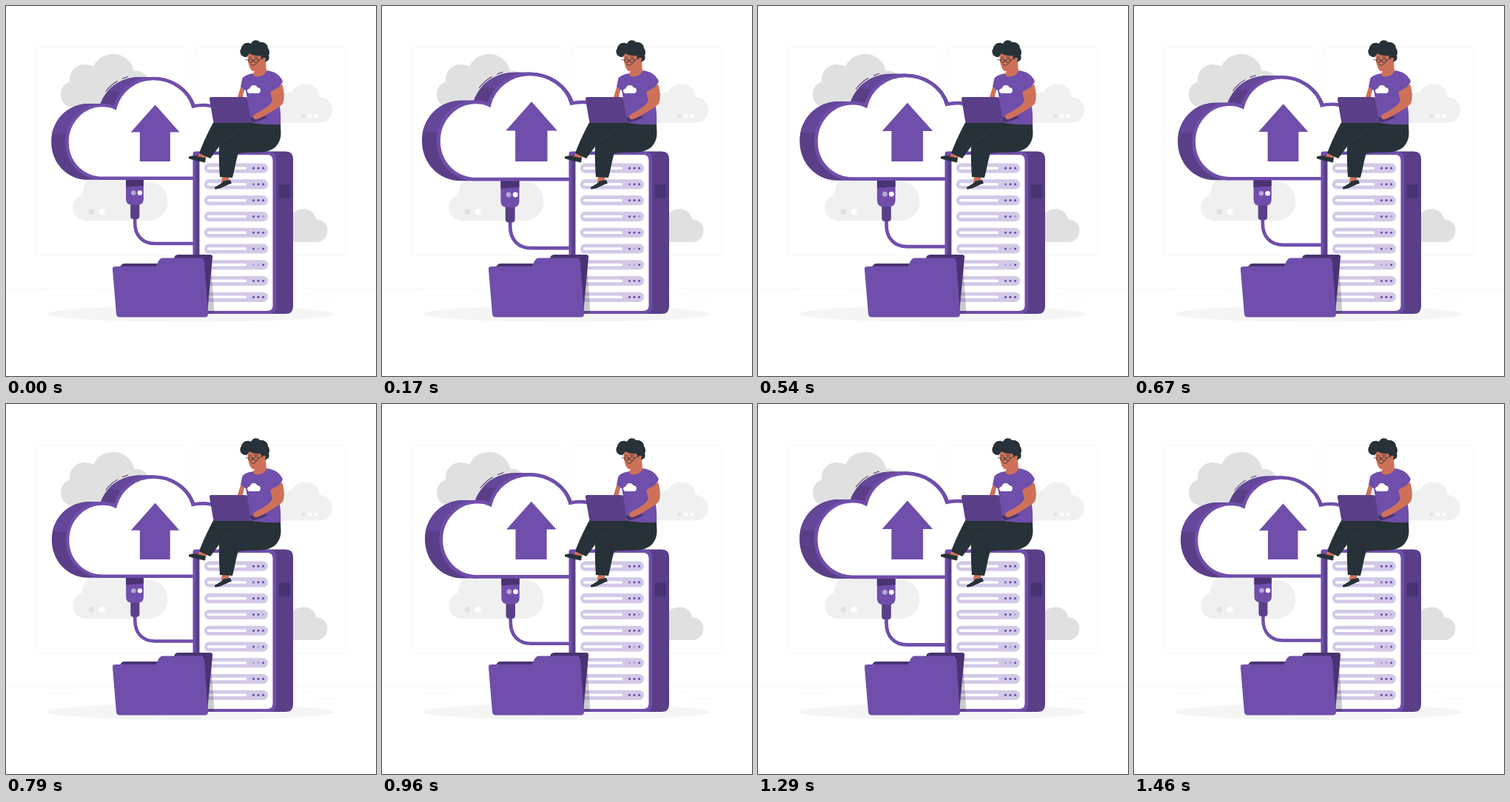
Recreate the animation shown at these times as an HTML page. Size 500 px wide and 500 px high, loop 1500 ms.

```html
<!DOCTYPE html>
<html lang="en">
<head>
<meta charset="utf-8">
<title>Cloud upload</title>
<style>
  html, body { margin: 0; width: 100%; height: 100%; overflow: hidden; background: #fff; }
  svg { display: block; width: 100vw; height: 100vh; }
  .main { fill: #704eab; }
  .side { fill: #5a3f88; }
  .deep { fill: #4a3372; }
  .ink { fill: #263238; }
  .skin { fill: #ce7158; }
  .grey { fill: #e0e0e0; }
  .pale { fill: #f0f0f0; }
  .white { fill: #fff; }
  .line { fill: none; stroke: #704eab; stroke-width: 4.5; }
  .thin { fill: none; stroke: #4a3372; stroke-width: 1; stroke-linecap: round; }
  .wall { fill: none; stroke: #f8f8f8; }
</style>
</head>
<body>
<svg viewBox="0 0 500 500">
  <!-- room -->
  <g class="wall">
    <rect x="39" y="55.5" width="204" height="282" rx="3"/>
    <rect x="255" y="55.5" width="204" height="282" rx="3"/>
    <path d="M0 382.5H500M400 389.5H416M418 398.5H448M55 390.5H98M108 390.5H116"/>
  </g>
  <path class="grey" d="M74 120C74 111 79 104 86 103C85 90 93 79 106 79C111 79 115 80 118 82C122 72 132 65 145 65C159 65 170 74 173 87.5C181 87 187 90 191 96L180 137H91C81 137 74 130 74 120Z"/>
  <path class="pale" d="M360 157.500H425C434 157.500 441 150 441 140.500C441 131 434 123.500 424 123C423 113 416 105.500 405 105.500C395 105.500 388 110 386 117C378 116 370 119 366 128Z"/>
  <circle class="grey" cx="401.500" cy="149" r="2.500"/>
  <circle class="white" cx="410.500" cy="149" r="2.500"/>
  <circle class="white" cx="419.500" cy="149" r="2.500"/>
  <path class="grey" d="M380 319H419C428 319 434.500 312 434.500 303.500C434.500 295 428 288.500 419 288.500C418 280 411 274.500 402 274.500C395 274.500 390 277 387 282L380 290Z"/>
  <path class="pale" d="M108 290C98 290 90.500 283 90.500 273C90.500 263 96 257 103 255.500C103 246 106 240 112 235L120 225H185L186 238H194C208 238 218.500 250 218.500 264C218.500 279 207 290 193 290Z"/>
  <circle class="grey" cx="115.500" cy="278" r="4"/>
  <circle class="white" cx="129.500" cy="278" r="4"/>
  <ellipse cx="249.500" cy="416" rx="194" ry="11" fill="#f5f5f5"/>

  <!-- pulsing cloud and plug -->
  <g id="cloud">
    <path class="line" d="M174.500 284V292C174.500 309 185 319.500 201 319.500H270"/>
    <path class="side" d="M168.500 262H180.500V283Q180.500 287 176.500 287H172.500Q168.500 287 168.500 283Z"/>
    <path class="main" d="M162.500 230H186V260Q186 268 178 268H170.500Q162.500 268 162.500 260Z"/>
    <path class="deep" d="M162.500 230H186V242.500L162.500 244Z"/>
    <circle cx="172.500" cy="252" r="3.200" fill="#b7a6d5"/>
    <circle class="white" cx="181" cy="252" r="3.200"/>
    <path class="side" d="M132 234.500H112C84 234.500 63 212 63 184C63 156 84 133.500 112 133H128.500C136 112 157 97.500 180 97.500H200C225 97.500 247 113 254.500 134L200 200Z"/>
    <path fill="#64469a" d="M64 173C69 150 88 133.500 112 133H131C107 135 88 150 84 173Z"/>
    <path fill="#64469a" d="M139 115C149 104 164 97.500 180 97.500H199C181 99 167 106 158 118Z"/>
    <path class="line white" style="fill:#fff" d="M132 232.500C104 232.500 84 211 84 184C84 157 105 135 131 135C138 135 143 136 148 138.500C154 115 175 99.500 199 99.500C224 99.500 246 115 252 136.500C256 135.500 262 135 266 135C290 135 312 157 312 184C312 211 290 232.500 266 232.500Z"/>
    <path class="thin" d="M135.500 117Q142 108 151 103M158 99.500L165 97"/>
    <path class="main" d="M201.500 134.500L234 171H221.500V210H181V171H169Z"/>
  </g>

  <!-- server -->
  <path class="side" d="M300 196.500H378Q388 196.500 388 206.500V406Q388 416 378 416H300Z"/>
  <path class="main" d="M252.500 200Q252.500 196.500 256 196.500H355Q365 196.500 365 206.500V406Q365 416 355 416H252.500Z"/>
  <path class="side" d="M256.500 202H261.500V416H256.500Z"/>
  <path class="white" d="M261.500 201H353Q360.500 201 360.500 208.500V404.500Q360.500 412 353 412H261.500Z"/>
  <rect class="deep" x="368.500" y="241.500" width="16" height="18.500" rx="1.500"/>
  <g id="rows"></g>

  <!-- folder -->
  <path d="M277 345L281.500 416H271Z" fill="#263238" opacity=".25"/>
  <path class="deep" d="M154 353Q156 348 160 348H224L228 338.500Q229 336 233 336H276Q279.500 336 279 340L272 416H160Z"/>
  <path class="main" d="M144 356Q143.500 352 148 352H202C206 346 207 340.500 212 340.500H263Q267.500 340.500 268 346L273 416Q273 420.500 269 420.500H154Q149.500 420.500 149 416Z"/>

  <!-- person -->
  <path class="skin" d="M317 110L313 123H320L322 113Z"/>
  <path class="skin" d="M262 197L259 204L268 207L273 203ZM292 229L291 238L300 239L302 230Z"/>
  <path class="ink" d="M247 203.500C252 202 257 202.500 260 203.500L270 205.500L269 211.500C262 210 252 208 247 206Z"/>
  <path class="ink" d="M282 245C287 242.500 292 239 294 236.500L303 235L305 239.500C298 242 290 247 284 247.500Q281 247 282 245Z"/>
  <path class="ink" d="M281 156L331 157L371 159L371.500 172C371 188 361 196.500 345 197.500C331 198 320 198 314 199C311 207 309 222 306 232L289 231C288 216 287.500 201 288 190L276 206L261 199C266 186 273 170 281 156Z"/>
  <path d="M288 190C291 182 300 178 310 173" fill="none" stroke="#3a464c" stroke-width=".8"/>
  <path class="main" d="M334 91C327 92 320 95 319 99L317 109.500C319 112 322 113 324 114L330 150L332 158Q352 161 371 160C372 147 370 130 366 116L374 102C371 94 364 88 351 87C348 93 339 97 334 91Z"/>
  <path class="skin" d="M338 82L334 92C336 98 348 96 352 88L351 74Z"/>
  <path class="skin" d="M326 66C327 75 328 84 333 88C338 89 345 83 348 75L349 64L330 60Z"/>
  <path class="ink" d="M325 69C318 70 314 62 318 57C319 51 326 48 331 51C333 45 341 45 343 49C349 48 354 52 354 57C357 61 356 65 355 67C357 71 354 76 349 75C346 74 345 70 344 67C338 68 332 66 329 64Z"/>
  <path class="skin" d="M345 72Q350 67 351 72Q350 77 345 77Z"/>
  <g fill="none" stroke="#263238" stroke-width=".8" stroke-linecap="round">
    <path d="M331 79Q335 82 338 78M329 69.500L331 69M336 69L340 69.500"/>
    <path d="M324 73H328M333 74L335 74M341 73L347 71"/>
    <circle cx="330.500" cy="74" r="2.600"/>
    <circle cx="338" cy="74" r="2.800"/>
  </g>
  <path class="white" d="M329 118Q326 117.500 326 114.500Q326.500 111.500 329.500 111.500Q330.500 107 335 107Q338.500 107 339.500 110Q344 110 344 114.500Q343.500 118 340 118Z"/>
  <path class="deep" d="M328 151L354 149C352 152 345 155 332 157.500Z"/>
  <path class="skin" d="M361 114C365 112 370 109 373 105.500C376 114 377 125 374 132C367 139 352 147 342 152Q335 155 334 150C334 147 338 145 342 143C350 139 357 134 360 128C359 124 358 119 357 116Z"/>
  <path class="side" d="M277 123H323Q326 123 326.500 126L331 155Q331 158 328 158H284Q280.500 158 280 155L275 126Q275 123 277 123Z"/>
</svg>
<script>
  const LOOP = 1500, FPS = 24;
  const PIVOT = { x: 193, y: 208.5 };
  // [step, scale] of the double beat, 36 steps per loop
  const BEAT = [[-1, 1], [6.2, 1.1], [20.2, 1], [27.5, 1.1], [35, 1], [42.2, 1.1]];
  // one letter per status light: d dark, m medium, l light
  const LIGHTS = ['ddd', 'mdd', 'ddd', 'ddl', 'ddd', 'dld', 'lld', 'ddd', 'ddd'];
  const TINT = { d: '#704eab', m: '#8e73bd', l: '#b3a1d3' };
  const cloud = document.getElementById('cloud');

  document.getElementById('rows').innerHTML = LIGHTS.map((lights, i) => {
    const y = 219.2 + i * 21.76;
    const dots = [...lights].map((c, j) =>
      `<circle cx="${334.5 + j * 6.5}" cy="${y}" r="1.6" fill="${TINT[c]}"/>`).join('');
    return `<rect x="268" y="${y - 6.6}" width="86" height="13.2" rx="6.6" fill="#d3c9e7"/>
      <rect x="272" y="${y - 1.8}" width="53" height="3.6" rx="1.8" fill="#fff"/>${dots}`;
  }).join('');

  function scaleAt(step) {
    const i = BEAT.findIndex(k => k[0] > step);
    const [a, from] = BEAT[i - 1], [b, to] = BEAT[i];
    return from + (to - from) * (step - a) / (b - a);
  }

  function draw(ms) {
    const step = Math.floor((ms % LOOP + 5) * FPS / 1000) % 36;
    const { x, y } = PIVOT;
    cloud.setAttribute('transform',
      `translate(${x} ${y}) scale(${scaleAt(step).toFixed(4)}) translate(${-x} ${-y})`);
  }

  const start = performance.now();
  function tick() {
    draw(performance.now() - start);
    requestAnimationFrame(tick);
  }
  draw(0);
  requestAnimationFrame(tick);
</script>
</body>
</html>
```
